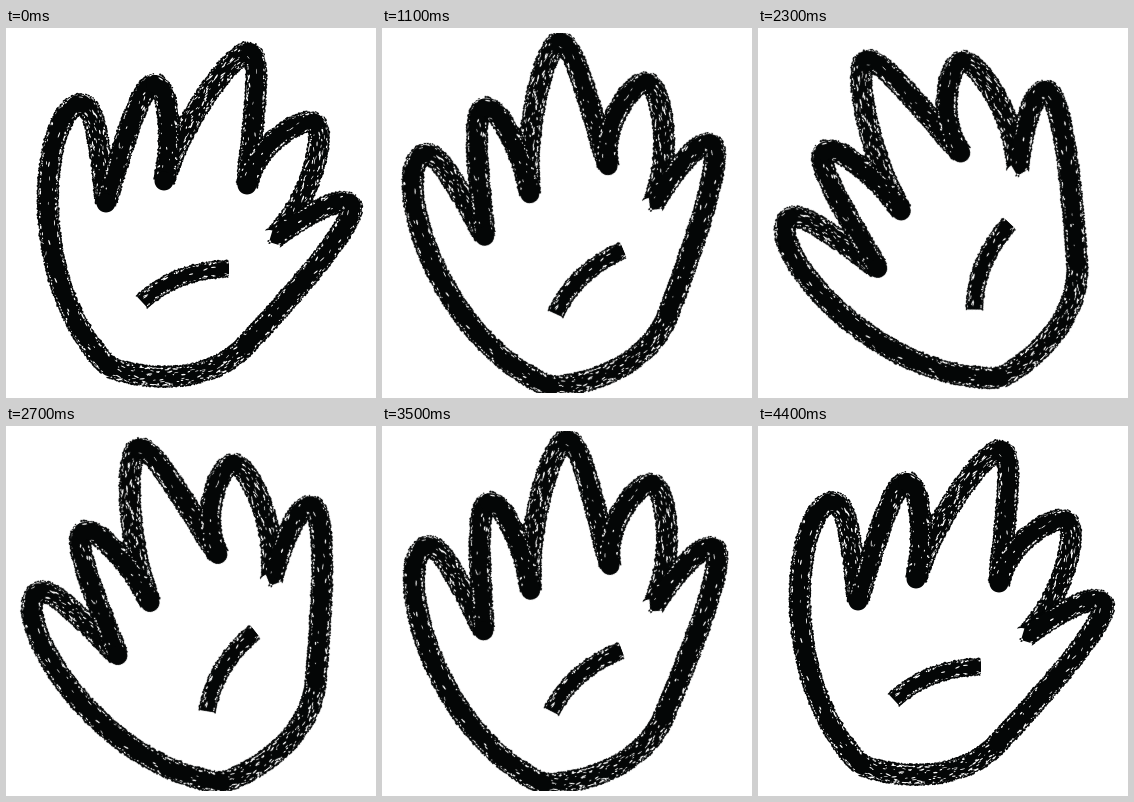
Animation of 370x370 px, one loop 4.5 s. Source, as an HTML page with a canvas:

```html
<!DOCTYPE html>
<html lang="en">
<head>
<meta charset="utf-8">
<title>Waving hand</title>
<style>
html, body { margin: 0; width: 100%; height: 100%; overflow: hidden; background: #fff; }
canvas { display: block; }
</style>
</head>
<body>
<canvas id="stage" width="370" height="370"></canvas>
<script>
const SIZE = 370, MID = SIZE / 2, SCALE = 2, INK = '#040606';
const LOOP = 4500, STEP = 100, PEAK = 2300, END = 4400, SWING = 47;
const WET = .12, DRY = .75; // how much paper shows through the ink
const TIP = 14;             // roundness of a fingertip

const gaps = [[100, 175], [158, 153], [241, 157], [263, 214]];
const wrist = [103, 339], heel = [240, 317];

let seed = 7;
function rnd() {
  seed = (seed * 16807) % 2147483647;
  return seed / 2147483647;
}
const spread = r => (rnd() * 2 - 1) * r;
const lerp = (a, b, t) => a.map((v, i) => v + (b[i] - v) * t);
const curve = (...pts) => `M${pts[0]}C${pts.slice(1)}`;

// Unit vector across a finger that stands between two base points
function across(left, right, tip) {
  const [x, y] = lerp(left, right, .5), dx = tip[0] - x, dy = tip[1] - y;
  const len = Math.hypot(dx, dy);
  return [-dy / len, dx / len];
}

// One side of a finger, from its gap to its tip, swelling along the given direction
function side(gap, tip, dir, bulge) {
  const push = (p, by) => p.map((v, i) => v + dir[i] * by);
  return curve(gap, push(lerp(gap, tip, .45), bulge), push(tip, Math.sign(bulge) * TIP), tip);
}

function finger(left, right, tip, bulgeLeft, bulgeRight) {
  const dir = across(left, right, tip);
  return [side(left, tip, dir, -bulgeLeft), side(right, tip, dir, bulgeRight)];
}

function dab(g, p, offset, length, thick, color) {
  g.fillStyle = color;
  g.beginPath();
  g.ellipse(p.x - Math.sin(p.dir) * offset, p.y + Math.cos(p.dir) * offset,
    length, thick, p.dir + spread(.3), 0, 7);
  g.fill();
}

function brush(g, shape, grain, width = 18, cap = 'round') {
  const path = document.createElementNS('http://www.w3.org/2000/svg', 'path');
  path.setAttribute('d', shape);
  const half = width / 2, points = [];
  for (let s = 0; s < path.getTotalLength() - 1; s++) {
    const { x, y } = path.getPointAtLength(s), next = path.getPointAtLength(s + 1);
    points.push({ x, y, dir: Math.atan2(next.y - y, next.x - x) });
  }
  g.strokeStyle = INK;
  g.lineWidth = width;
  g.lineCap = cap;
  g.stroke(new Path2D(shape));
  for (const p of points) {
    for (const edge of [-half, half]) {
      const out = Math.sign(edge) * rnd() * 1.6;
      dab(g, p, edge + out, .6 + rnd(), .5 + rnd() * .8, INK);
      if (rnd() < .25) dab(g, p, edge - out, .5 + rnd(), .3 + rnd() * .6, '#fff');
    }
  }
  for (const p of points) {
    if (rnd() < grain) dab(g, p, spread(half), .6 + rnd() * 2.4, .3 + rnd() * .45, '#fff');
  }
}

function drawHand() {
  const layer = document.createElement('canvas');
  layer.width = layer.height = SIZE * SCALE;
  const g = layer.getContext('2d');
  g.scale(SCALE, SCALE);

  const pinky = [76, 76], thumb = [345, 176];
  const [ringL, ringR] = finger(gaps[0], gaps[1], [149, 56], 6, 14);
  const [middleL, middleR] = finger(gaps[1], gaps[2], [244, 24], 20, 4);
  const [indexL, indexR] = finger(gaps[2], gaps[3], [309, 95], 26, 27);
  const thumbDir = across(gaps[3], [290, 265], thumb);

  const wet = [
    curve(pinky, [40, 72], [12, 246], wrist),
    ringL, ringR, middleR, indexL,
    side(gaps[3], thumb, thumbDir, -9),
    curve(thumb, [356, 192], [270, 285], heel)
  ];
  const dry = [
    side(gaps[0], pinky, [1, 0], 6),
    middleL, indexR,
    curve(heel, [208, 352], [150, 356], wrist)
  ];
  dry.forEach(shape => brush(g, shape, DRY));
  wet.forEach(shape => brush(g, shape, WET));
  brush(g, curve([136, 274], [162, 250], [192, 241], [223, 241]), WET, 14, 'butt');

  g.fillStyle = INK;
  for (const [x, y] of gaps) {
    g.beginPath();
    g.arc(x, y, 9.5, 0, 7);
    g.fill();
  }
  g.strokeStyle = '#fff';
  g.beginPath();
  g.arc(...gaps[3], 5, .3, 5);
  g.stroke();
  return layer;
}

const hand = drawHand();
const ctx = document.getElementById('stage').getContext('2d');
ctx.imageSmoothingQuality = 'high';
const start = performance.now();

function frame() {
  const time = Math.floor((performance.now() - start) % LOOP / STEP) * STEP;
  const part = time < PEAK ? time / PEAK : (END - time) / (END - PEAK);
  ctx.fillStyle = '#fff';
  ctx.fillRect(0, 0, SIZE, SIZE);
  ctx.save();
  ctx.beginPath();
  ctx.rect(5, 5, 360, 360);
  ctx.clip();
  ctx.translate(MID, MID);
  ctx.rotate(-SWING * part * Math.PI / 180);
  ctx.drawImage(hand, -MID, -MID, SIZE, SIZE);
  ctx.restore();
  requestAnimationFrame(frame);
}
frame();
</script>
</body>
</html>
```
